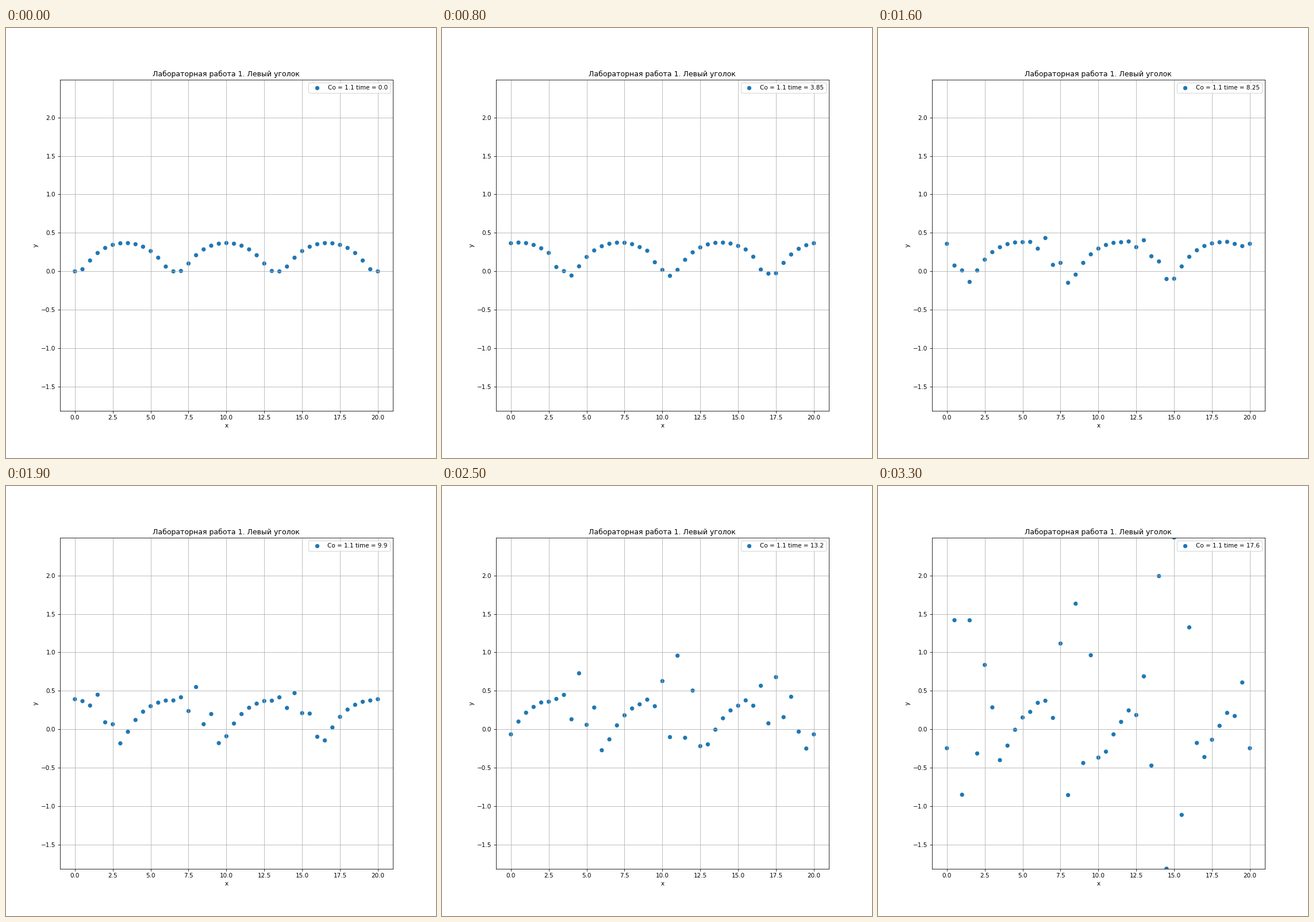
A matplotlib script that plays this animation: 748 by 748 pixels, repeating every 3400 ms.

```python
import numpy as np
import matplotlib.pyplot as plt
from matplotlib.animation import FuncAnimation

SIZE, DPI = 10, 74.8  # inches, 748 px square
FRAMES, INTERVAL = 34, 100
LENGTH, H, CO = 20.0, 0.5, 1.1
TAU = CO * H
STEPS = FRAMES - 2

plt.rcParams["font.family"] = "DejaVu Sans"


def bumps(x, count=3):
    """Row of smooth bumps exp(-1 / (1 - s^2)) filling the interval."""
    s = 2 * ((x * count / LENGTH) % 1) - 1
    gap = 1 - s**2
    safe = np.where(gap > 1e-9, gap, 1)
    return np.where(gap > 1e-9, np.exp(-1 / safe), 0)


def solve(u, steps):
    """Upwind scheme with periodic boundary; one row per time layer."""
    layers = [u]
    for _ in range(steps):
        u = u - CO * (u - np.roll(u, 1))
        layers.append(u)
    layers = np.array(layers)
    return np.hstack([layers, layers[:, :1]])


def label(step):
    return f"Co = {CO} time = {round(step * TAU, 2)}"


x = np.linspace(0, LENGTH, int(LENGTH / H) + 1)
layers = solve(bumps(x[:-1]), STEPS)

fig, ax = plt.subplots(figsize=(SIZE, SIZE), dpi=DPI)
# one size per dot keeps the dots off the whole-pixel grid
dots = ax.scatter(x, layers[0], s=np.full(x.size, 36.0),
                  color="tab:blue", label=label(0))
ax.set_xlim(-1, 21)
ax.set_ylim(layers.min(), layers.max())
ax.set_xticks(np.arange(0, 20.1, 2.5))
ax.set_yticks(np.arange(-1.5, 2.1, 0.5))
ax.set_title("Лабораторная работа 1. Левый уголок")
ax.set_xlabel("x")
ax.set_ylabel("y")
ax.grid()
caption = ax.legend(loc="upper right").get_texts()[0]


def update(frame):
    step = max(0, frame - 1)  # the initial state is held for two frames
    dots.set_offsets(np.column_stack([x, layers[step]]))
    caption.set_text(label(step))
    return dots, caption


anim = FuncAnimation(fig, update, frames=FRAMES, interval=INTERVAL,
                     repeat=True, repeat_delay=0, blit=False)
plt.show()
```
